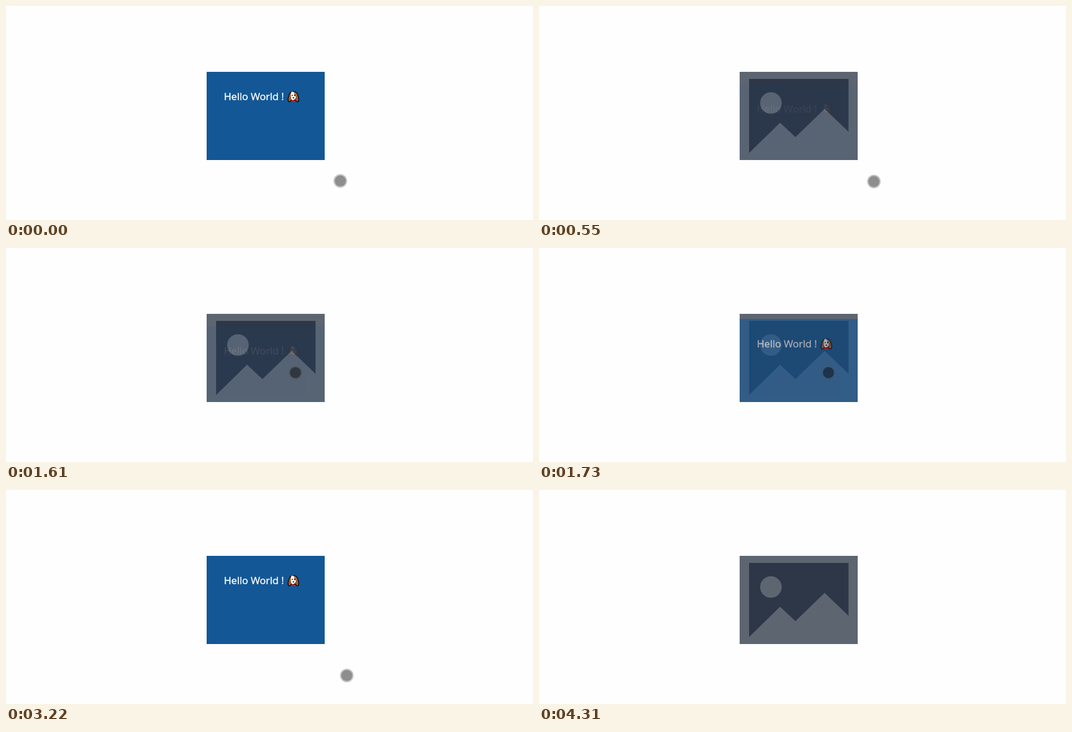
Recreate the animation shown at these times as an HTML page. Size 893 by 364 pixels, loop 5110 ms.

```html
<!DOCTYPE html>
<html lang="en">
<head>
<meta charset="utf-8">
<title>Card reveal</title>
<style>
  html, body { margin: 0; width: 100%; height: 100%; overflow: hidden; background: #fefefe; }
  svg { display: block; }
  text { font: 17px "Open Sans", "Noto Sans", sans-serif; fill: #fff; stroke: #fff; stroke-width: .35px; }
</style>
</head>
<body>
<svg width="893" height="364" viewBox="0 0 893 364">
  <clipPath id="card"><rect x="340" y="112" width="200" height="150"/></clipPath>
  <g clip-path="url(#card)">
    <rect x="340" y="112" width="200" height="150" fill="#5d6571"/>
    <path d="M356 124H524.5V214L484 175L434.5 223L408.5 198.5L356 250Z" fill="#2d3748"/>
    <circle cx="393" cy="165" r="18.3" fill="#5d6571"/>
    <g id="cover">
      <rect x="340" y="112" width="200" height="150" fill="#135796"/>
      <text x="369.3" y="160">Hello World !</text>
      <path d="M482 158H492L491 163.3H483Z" fill="#d8141c"/>
      <path d="M487 145.8C493 145.8 494 149 495.3 154C496.5 159 496.6 163 493.5 163C491.5 163 491.5 161 490.5 160H483.5C482.5 161 482.5 163 480.5 163C477.4 163 477.5 159 478.7 154C480 149 481 145.8 487 145.8Z"
            fill="#9c5d35" stroke="#000" stroke-width="1.2"/>
      <path d="M487 146.6Q491.4 147 491.3 152.5T487 160T482.7 152.5T487 146.6Z" fill="#fff"/>
      <path d="M488.3 147Q491.3 148 491.3 153.5H488.6Z" fill="#9c5d35"/>
      <circle cx="485.2" cy="152" r=".9"/>
      <circle cx="489.2" cy="152" r=".9"/>
      <ellipse cx="487" cy="156.3" rx="1.5" ry="1"/>
    </g>
  </g>
  <g id="pointer">
    <circle r="9.5" fill="#000" fill-opacity=".44"/>
    <circle r="10.5" fill="none" stroke="#505050" stroke-opacity=".33" stroke-width="2"/>
  </g>
</svg>
<script>
const LOOP = 5110, SLIDE = 22.5;

const fades = [
  { at: 310, end: 550, steps: 5, from: 1, to: .05 },
  { at: 1610, end: 1910, steps: 6, from: 0, to: 1 },
  { at: 3400, end: 3630, steps: 5, from: 1, to: 0 }
];

const glides = [
  { at: 0, end: 60, steps: 2, from: [566.5, 297.5], to: [567.5, 298.5] },
  { at: 850, end: 1250, steps: 8, from: [567.5, 298.5], to: [490.5, 212] },
  { at: 2220, end: 2340, steps: 3, from: [490.5, 212.5], to: [515, 250], leaves: true },
  { at: 2510, end: 2720, steps: 5, from: [557, 295.5], to: [577.5, 315.5] },
  { at: 4000, end: 4310, steps: 6, from: [577.5, 315.5], to: [815, 360], leaves: true }
];

const cover = document.getElementById('cover');
const pointer = document.getElementById('pointer');
const start = performance.now();

const mix = (a, b, p) => a + (b - a) * p;
const smooth = p => p * p * (3 - 2 * p);
const fadeEase = p => 1 - (1 - p * p) ** 3;
const latest = (list, t) => list.filter(m => m.at <= t).pop();

// Number of steps already shown, from 1 to m.steps
const shown = (m, t) => 1 + Math.floor(Math.min(1, (t - m.at) / (m.end - m.at)) * (m.steps - 1));

function coverAlpha(t) {
  const m = latest(fades, t);
  return m ? mix(m.from, m.to, fadeEase(shown(m, t) / m.steps)) : 1;
}

function draw(now) {
  const t = Math.max(0, now - start) % LOOP;
  const alpha = coverAlpha(t);
  cover.setAttribute('opacity', alpha);
  cover.setAttribute('transform', `translate(0 ${Math.round(SLIDE * (1 - alpha))})`);

  const m = latest(glides, t);
  const p = smooth((shown(m, t) - 1) / (m.steps - 1));
  const [x, y] = m.from.map((v, i) => mix(v, m.to[i], p));
  pointer.setAttribute('transform', `translate(${x} ${y})`);
  pointer.setAttribute('visibility', m.leaves && t >= m.end ? 'hidden' : 'visible');
  requestAnimationFrame(draw);
}
draw(start);
</script>
</body>
</html>
```
